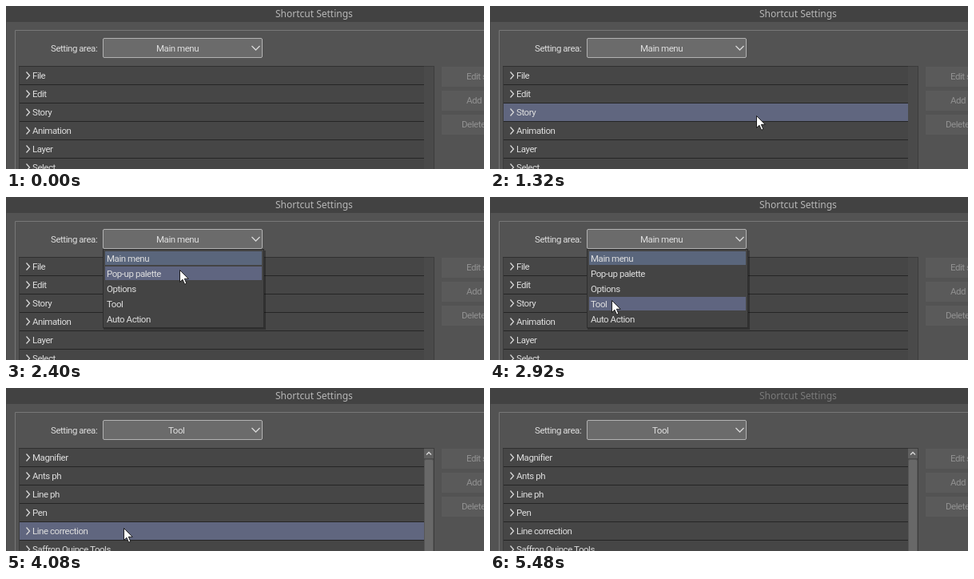
Write an HTML page that moves like this. It is 598 by 204 pixels and loops after 5.52 s.

```html
<!DOCTYPE html>
<html lang="en">
<head>
<meta charset="utf-8">
<title>Shortcut Settings</title>
<style>
html, body { margin: 0; width: 100%; height: 100%; overflow: hidden; background: #535353; }
svg { display: block; width: 598px; height: 204px; }
text { font: 11.5px Roboto, "Liberation Sans", sans-serif; letter-spacing: -.45px; fill: #dedede; white-space: pre; }
#title { font: 12px "Noto Sans", "Open Sans", sans-serif; letter-spacing: 0; }
.dim { fill: #929292; }
.chevron { fill: none; stroke: #d8d8d8; stroke-width: 1.3; }
</style>
</head>
<body>
<svg id="stage" viewBox="0 0 598 204" xmlns="http://www.w3.org/2000/svg"></svg>
<script>
const LOOP = 5520, TICK = 40;
const ROW_TOP = 76, ROW_STEP = 23, ITEM_TOP = 68, ITEM_STEP = 19;
const MAIN = ["File", "Edit", "Story", "Animation", "Layer", "Select"];
const TOOLS = ["Magnifier", "Ants ph", "Line ph", "Pen", "Line correction", "Saffron Quince Tools"];
const AREAS = ["Main menu", "Pop-up palette", "Options", "Tool", "Auto Action"];
const stage = document.getElementById("stage");

function add(tag, attrs, parent = stage) {
  const node = document.createElementNS("http://www.w3.org/2000/svg", tag);
  for (const key in attrs) node.setAttribute(key, attrs[key]);
  return parent.appendChild(node);
}
const rect = (x, y, width, height, fill, parent) => add("rect", { x, y, width, height, fill }, parent);
const path = (d, attrs, parent) => add("path", { d, ...attrs }, parent);
function label(x, y, str, attrs, parent) {
  const node = add("text", { x, y, ...attrs }, parent);
  node.textContent = str;
  return node;
}
const show = (node, on) => node.setAttribute("visibility", on ? "visible" : "hidden");

// Window and frame
rect(0, 0, 598, 204, "#535353");
rect(0, 0, 598, 20, "#424242");
rect(0, 20, 1, 184, "#484848");
path("M11.5 204V30.5H598", { fill: "none", stroke: "#777" });
const title = label(337, 14, "Shortcut Settings", { id: "title" });

// Area selector
label(56, 57, "Setting area:");
const button = add("rect", { x: 121.5, y: 40.5, width: 199, height: 24, rx: 1.5, stroke: "#b2b2b2" });
const area = label(188, 57, "Main menu");
path("M307.5 50l5 5 5-5", { class: "chevron" });

// Command list
rect(16, 75, 520, 129, "#3c3c3c");
rect(523, 76, 12, 128, "#4a4a4a");
const rows = MAIN.map((name, i) => {
  const y = ROW_TOP + i * ROW_STEP;
  const back = rect(17, y, 506, 22, "#464646");
  rect(17, y + 22, 506, 1, "#252525");
  path(`M25.5 ${y + 6.5}l4 4.5-4 4.5`, { class: "chevron" });
  return { back, text: label(33, y + 15, name) };
});
rect(16, 75, 507, 1, "#303030");

const scroll = add("g", {});
rect(523, 76, 12, 12, "#606060", scroll);
path("M526 83.5l3-3 3 3", { class: "chevron" }, scroll);
add("rect", { x: 523.5, y: 89.5, width: 11, height: 130, rx: 2, fill: "#686868", stroke: "#575757" }, scroll);

// Side buttons
[["Edit s", 576], ["Add", 576], ["Delete", 570]].forEach(([name, x], i) => {
  const y = 76 + i * 30;
  rect(545, y, 53, 25, "#5a5a5a");
  label(x, y + 16, name, { class: "dim" });
});

// Drop-down menu
const menu = add("g", {});
add("rect", { x: 122, y: 67, width: 203, height: 99, fill: "#000", opacity: .3 }, menu);
add("rect", { x: 121.5, y: 65.5, width: 201, height: 98, fill: "#444", stroke: "#2e2e2e" }, menu);
const items = AREAS.map((name, i) => {
  const y = ITEM_TOP + i * ITEM_STEP;
  const back = rect(124, y, 196, 17, "none", menu);
  label(126, y + 13, name, {}, menu);
  return back;
});

const cursor = path("M.5 .5v15l3.4-3.3 2.7 6 2.3-1-2.6-5.9h4.9z", { fill: "#fff", stroke: "#111", "stroke-width": .9 });

const easeOut = p => u => 1 - (1 - u) ** p;
const easeIn = p => u => u ** p;
// start, end, from x, from y, to x, to y, easing
const MOVES = [
  [1200, 1640, 359, 192, 291, 47, easeOut(1.5)],
  [2000, 2920, 291, 47, 152, 129, easeOut(1.33)],
  [3560, 4120, 152, 129, 146, 184, easeIn(2.445)],
  [4120, 4280, 146, 184, 145, 206, easeIn(1)]
];

function pointer(t) {
  if (t < 1200 || t >= 4280) return null;
  const [start, end, x0, y0, x1, y1, ease] = MOVES.filter(m => t >= m[0]).pop();
  const k = ease(Math.min(1, (t - start) / (end - start)));
  return { x: x0 + (x1 - x0) * k, y: y0 + (y1 - y0) * k };
}

function render(ms) {
  const t = Math.floor(ms % LOOP / TICK) * TICK;
  const at = pointer(t);
  const open = t >= 1760 && t < 3200;
  const picked = t >= 3200, listed = t >= 3240;

  title.style.fill = t >= 5480 ? "#7b7b7b" : "#b8b8b8";
  area.textContent = picked ? "Tool" : "Main menu";
  area.setAttribute("x", picked ? 203 : 188);
  button.setAttribute("fill", at && !open && at.y < 65 ? "#666c88" : "#6b6b6b");
  show(scroll, listed);
  show(menu, open);
  show(cursor, !!at);
  if (at) cursor.setAttribute("transform", `translate(${Math.round(at.x)} ${Math.round(at.y)})`);

  const settled = t < 1760 || listed;
  const row = at && settled ? Math.floor((at.y - ROW_TOP) / ROW_STEP) : -1;
  rows.forEach(({ back, text }, i) => {
    back.setAttribute("fill", i === row ? "#60667f" : "#464646");
    text.textContent = (listed ? TOOLS : MAIN)[i];
  });

  const item = at && open ? Math.floor((at.y - ITEM_TOP) / ITEM_STEP) : -1;
  items.forEach((back, i) =>
    back.setAttribute("fill", i === 0 ? "#5a667c" : i === item ? "#5f6580" : "none"));
}

const begin = performance.now();
function loop() {
  render(performance.now() - begin);
  requestAnimationFrame(loop);
}
loop();
</script>
</body>
</html>
```
